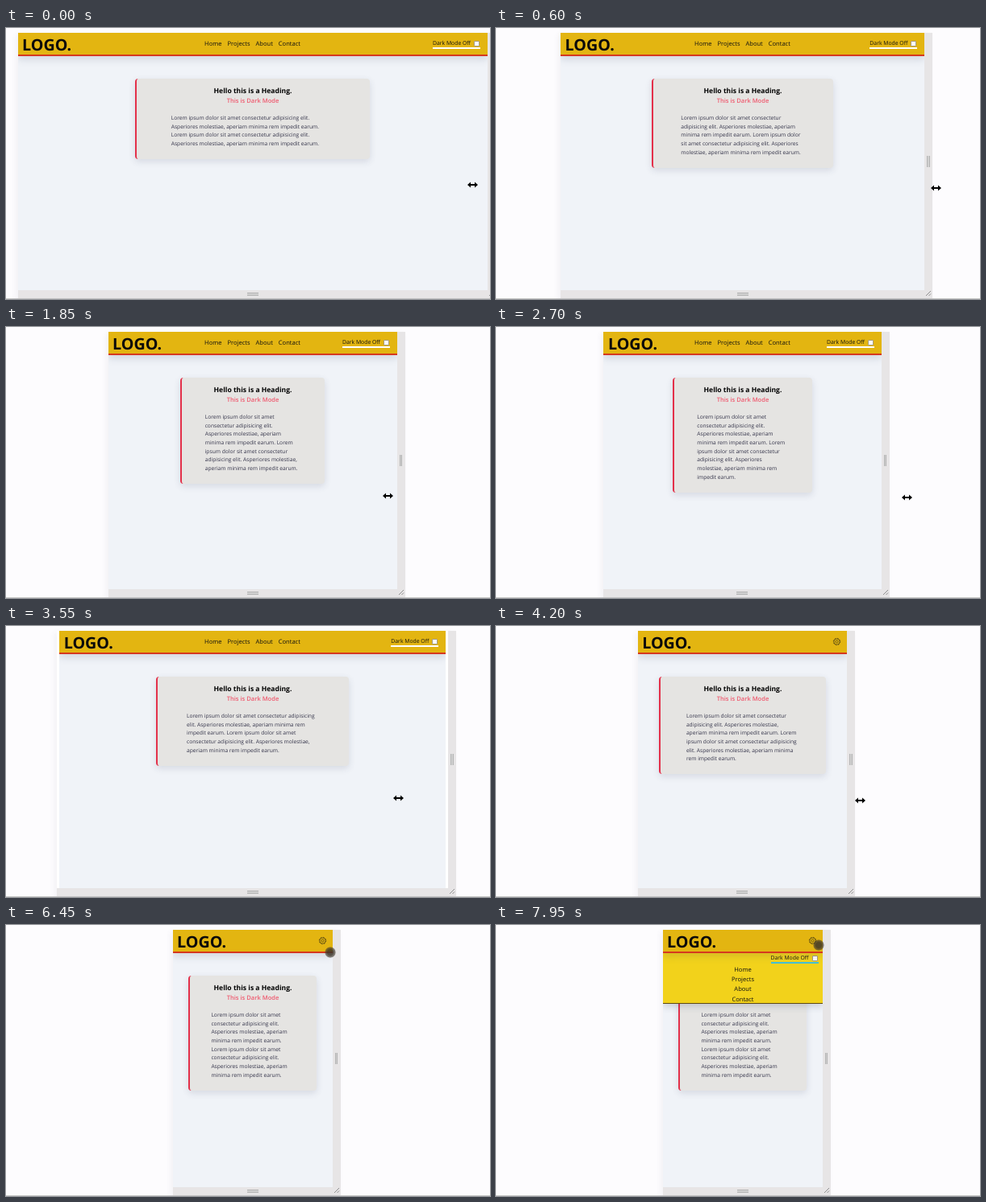
Animation, 600 px wide and 337 px high, one loop 8 s. Source, as an HTML page:

```html
<!DOCTYPE html>
<html lang="en">
<head>
<meta charset="utf-8">
<title>Responsive resize</title>
<style>
  html, body { margin: 0; width: 100%; height: 100%; overflow: hidden; background: #fdfcfe; }
  body { font-family: "Open Sans", "Noto Sans", sans-serif; text-rendering: geometricPrecision; color: #111; }
  div, svg { position: absolute; }
  p, h1, h2 { margin: 0; }
  #stage { width: 600px; height: 337px; overflow: hidden; }
  #floor { top: 336px; width: 600px; height: 1px; background: #c8c8c8; }
  #frame { top: 6px; height: 330px; background: #e7e5e6; box-shadow: -3px 2px 7px rgba(60, 70, 100, .06); }
  #view { left: 0; top: 0; right: 10px; height: 319.5px; background: #fff; overflow: hidden; }
  #page { top: 0; height: 320px; background: #f0f3f8; overflow: hidden; }
  .grip { box-sizing: border-box; border: solid #b4b4b4; background: #d0d0d0; }
  #gripX { right: 3.5px; top: 152.5px; width: 3.5px; height: 14px; border-width: 0 1px; }
  #gripY { left: calc(50% - 12px); bottom: 3.5px; width: 14px; height: 3.5px; border-width: 1px 0; }
  #corner { right: 1px; bottom: 2px; }

  #header { z-index: 3; left: 0; right: 0; height: 27px; background: #e3b511; border-bottom: 2px solid #d6381f;
    box-shadow: 0 4px 9px rgba(50, 60, 90, .16); }
  #logo { left: 5.5px; top: .8px; font: 700 19.7px/27px "Open Sans", "Noto Sans", sans-serif; color: #0a0a0a; }
  #nav { left: 0; right: 0; top: 7.6px; display: flex; justify-content: center; gap: 7px;
    font-size: 7.55px; line-height: 12.4px; }
  .toggle { width: 59px; height: 10px; border-bottom: 2px solid #fff; font-size: 6.84px; line-height: 12px; white-space: nowrap; }
  .toggle::after { content: ""; position: absolute; right: 1px; top: 2px; width: 5px; height: 5px; background: #fff;
    border: .5px solid #a59a80; border-radius: 1px; }
  #header .toggle { right: 8.5px; top: 7.5px; }
  #gear { right: 7px; top: 8px; }

  #menu { z-index: 2; left: 0; right: 0; top: 29px; height: 62px; background: #f2d21b; border-bottom: 1px solid #5c4812;
    box-shadow: 0 4px 8px rgba(50, 60, 90, .18); }
  #menu .toggle { right: 5px; top: 1.2px; border-color: #45bfd6; }
  #menu p { position: relative; text-align: center; font-size: 7.55px; line-height: 12.45px; top: 14.5px; left: .5px; }

  #card { top: 57px; box-sizing: border-box; padding: 9.3px 0 13.5px; background: #e5e4e2; border-left: 2px solid #e3304a;
    border-radius: 4px; box-shadow: 0 3px 8px rgba(50, 60, 90, .14); }
  #card h1, #card h2 { position: relative; left: -.5px; text-align: center; white-space: nowrap; line-height: 12.4px; }
  #card h1 { font-size: 8.55px; font-weight: 700; color: #000; }
  #card h2 { font-size: 7.55px; font-weight: 600; color: #ef5b70; }
  #card p { margin: 9.8px auto 0; position: relative; left: -.7px; font-size: 6.67px; line-height: 10.65px; color: #34344a; }

  #dot { z-index: 5; width: 14px; height: 14px; margin: -7px; border-radius: 50%;
    background: radial-gradient(rgba(60, 52, 40, .85) 35%, rgba(70, 62, 50, .6) 62%, rgba(70, 62, 50, 0) 72%); }
  #arrow { z-index: 5; margin: -4px -6.5px; }
</style>
</head>
<body>
<div id="stage">
  <div id="floor"></div>
  <div id="frame">
    <div id="view"><div id="page">
      <div id="header">
        <div id="logo">LOGO.</div>
        <div id="nav" class="wide"><span>Home</span><span>Projects</span><span>About</span><span>Contact</span></div>
        <div class="toggle wide">Dark Mode Off</div>
        <svg id="gear" class="narrow" width="11" height="11" viewBox="-5.5 -5.5 11 11" fill="none" stroke="#4a3e14">
          <circle r="4.2" stroke-width=".8" stroke-dasharray="1.65 1.65"/>
          <circle r="3.7" stroke-width=".7"/>
          <circle r="1.6" stroke-width=".7"/>
        </svg>
      </div>
      <div id="menu" class="narrow">
        <div class="toggle">Dark Mode Off</div>
        <p>Home</p><p>Projects</p><p>About</p><p>Contact</p>
      </div>
      <div id="card">
        <h1>Hello this is a Heading.</h1>
        <h2>This is Dark Mode</h2>
        <p id="text">Lorem ipsum dolor sit amet consectetur adipisicing elit. Asperiores molestiae, aperiam minima rem impedit earum.
          Lorem ipsum dolor sit amet consectetur adipisicing elit. Asperiores molestiae, aperiam minima rem impedit earum.</p>
      </div>
    </div></div>
    <div id="gripX" class="grip"></div>
    <div id="gripY" class="grip"></div>
    <svg id="corner" width="8" height="8" stroke="#8f8f8f"><path d="M1 7 7 1M4.500 7 7 4.500"/></svg>
  </div>
  <svg id="arrow" width="13" height="8"><path d="M0 4 4 .5V3H9V.5L13 4 9 7.500V5H4V7.500Z"/></svg>
  <div id="dot"></div>
</div>
<script>
const LOOP = 8000, STEP = 50;
const RELEASE = 6050;          // drag ends, pointer leaves the handle
const LAG = 100;               // the frame trails the pointer
const BREAKPOINT = 284;

const pointerX = [[-95, 613.5], [0, 578], [250, 556], [500, 548], [600, 545], [750, 545], [850, 537],
  [1300, 510], [1700, 501.5], [1755, 501.5], [1850, 473], [2100, 462], [2350, 470], [2550, 487], [3000, 555],
  [3200, 565.5], [3450, 565], [3550, 486], [3900, 455], [4200, 451], [4300, 437], [4700, 402], [5000, 399.5],
  [5200, 399.5], [5600, 421.5], [RELEASE, 421.5], [6400, 402], [6800, 399], [7950, 400]];
const pointerY = [[0, 195], [600, 199], [1850, 210], [3550, 214], [5100, 220], [RELEASE, 220],
  [6400, 36], [6450, 34], [6800, 23], [7950, 25]];
const menuOpen = [[7300, 0], [7850, 1]];

const $ = id => document.getElementById(id);
const ease = k => k * k * (3 - 2 * k);

function at(keys, t) {
  const i = keys.findIndex(key => key[0] >= t);
  if (i < 0) return keys[keys.length - 1][1];
  if (i === 0) return keys[0][1];
  const [t0, a] = keys[i - 1], [t1, b] = keys[i];
  return a + (b - a) * (t - t0) / (t1 - t0);
}

function place(el, left, width) {
  el.style.left = left + "px";
  el.style.width = width + "px";
}

function show(selector, visible) {
  document.querySelectorAll(selector).forEach(el => el.style.display = visible ? "" : "none");
}

function draw(t) {
  const leftEdge = lag => 628 - at(pointerX, Math.min(t - lag, RELEASE));
  const left = leftEdge(LAG);
  const inner = Math.max(left, leftEdge(LAG - 4));
  const width = 611 - 2 * inner;
  const narrow = width < BREAKPOINT;
  const cardWidth = width * (narrow ? .8 : .5);

  place($("frame"), left, 621 - 2 * left);
  place($("page"), inner - left, width);
  place($("card"), (width - cardWidth) / 2, cardWidth);
  $("text").style.width = cardWidth * .75 - 16 + "px";
  show(".wide", !narrow);
  show(".narrow", narrow);

  const open = ease(at(menuOpen, t));
  $("menu").style.transform = `translateY(${(open - 1) * 75}px)`;

  const dragging = t <= RELEASE;
  show("#arrow", dragging);
  show("#dot", !dragging);
  const pointer = $(dragging ? "arrow" : "dot");
  pointer.style.left = at(pointerX, t) + "px";
  pointer.style.top = at(pointerY, t) + "px";
}

const start = performance.now();
function tick() {
  const t = (performance.now() - start) % LOOP;
  draw(Math.floor(t / STEP) * STEP);
  requestAnimationFrame(tick);
}
tick();
</script>
</body>
</html>
```
